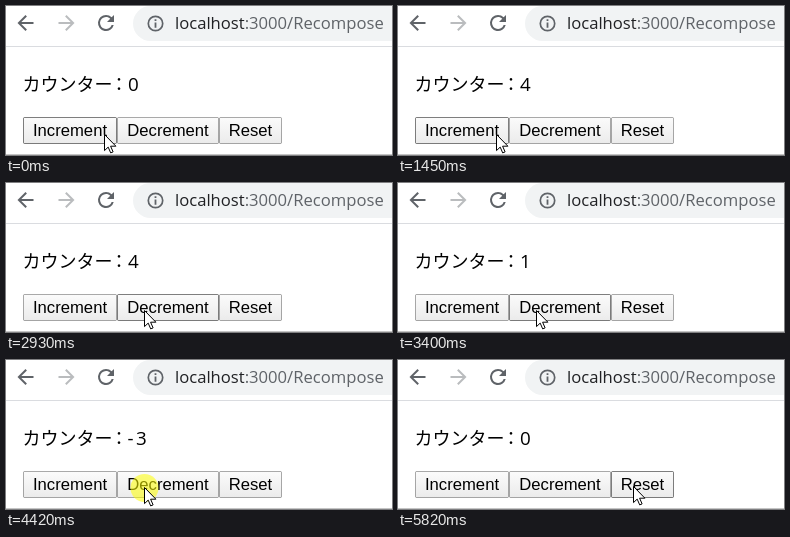
An HTML page for the animation above (6050 ms loop, 386 by 149 pixels).

```html
<!DOCTYPE html>
<html lang="ja">
<head>
<meta charset="utf-8">
<title>Counter</title>
<style>
  html, body { margin: 0; width: 100%; height: 100%; overflow: hidden; background: #fff; }
  svg { display: block; width: 386px; height: 149px; }
  .url { font: 16.64px "Open Sans", sans-serif; fill: #202124; }
  .url .path { fill: #5f6368; }
  .kana { font: 300 18px "Noto Sans CJK JP", "Noto Sans CJK", sans-serif; }
  .digits { font: 18.8px "Open Sans", sans-serif; }
  .label { font: 16.67px "Liberation Sans", Arial, sans-serif; }
</style>
</head>
<body>
<svg viewBox="0 0 386 149">
  <defs>
    <linearGradient id="face" x1="0" y1="0" x2="0" y2="1">
      <stop offset="0" stop-color="#fbfbfb"/>
      <stop offset="1" stop-color="#ebebeb"/>
    </linearGradient>
    <path id="arrow" d="M20 11H7.83l5.59-5.59L12 4l-8 8 8 8 1.41-1.41L7.83 13H20z"/>
  </defs>
  <rect width="386" height="149" fill="#fff"/>

  <!-- toolbar -->
  <g fill="#5f6368">
    <use href="#arrow" transform="translate(7.5 5)"/>
    <use href="#arrow" transform="translate(72.5 5) scale(-1 1)" fill="#babcbe"/>
    <path transform="translate(88 5)" d="M17.65 6.35A7.96 7.96 0 0 0 12 4a8 8 0 1 0 7.73 10h-2.08A6 6 0 1 1 12 6c1.66 0 3.14.69 4.22 1.78L13 11h7V4z"/>
    <rect x="127" y="0" width="300" height="35" rx="17.5" fill="#f1f3f4"/>
    <circle cx="149.5" cy="17.5" r="7.2" fill="none" stroke="#5f6368" stroke-width="1.7"/>
    <path d="M148.6 13.2h1.8v1.8h-1.8zM148.6 16.6h1.8v5.2h-1.8z"/>
  </g>
  <text class="url" x="169" y="23">localhost<tspan class="path">:3000/Recompose</tspan></text>
  <rect y="40" width="386" height="1" fill="#dadce0"/>
  <rect y="148" width="386" height="1" fill="#c4c4c4"/>

  <!-- page -->
  <text class="kana" x="16.5" y="85">カウンター<tspan dx="-2.5">：</tspan></text>
  <text class="digits" id="sign" x="121.5" y="85">-</text>
  <text class="digits" id="digit" y="85"></text>
  <g id="buttons"></g>
  <circle id="halo" r="14" fill="#ff0" fill-opacity=".55"/>
  <path id="cursor" d="M.5 .5V16.6L4.2 13.1 6.7 18.9 9.1 17.9 6.6 12.2H11.9Z" fill="#fff" stroke="#000"/>
</svg>
<script>
  const LOOP = 6050;
  const PERIOD = 150, SHORT = 70, LONG = 170;
  const $ = id => document.getElementById(id);

  const increment = n => n + 1;
  const decrement = n => n - 1;
  const reset = () => 0;

  const easeOut = k => 1 - (1 - k) ** 3;
  const easeInOut = k => k < .5 ? 2 * k * k : 1 - 2 * (1 - k) ** 2;

  // Evenly spaced clicks; from the third on, the button is held longer.
  const burst = (start, times, action) => Array.from({ length: times }, (_, i) => {
    const press = start + i * PERIOD;
    return { press, release: press + (i < 2 ? SHORT : LONG), action };
  });

  const clicks = [
    burst(840, 3, increment), burst(1370, 1, increment), burst(2000, 1, increment),
    burst(2860, 3, decrement), burst(3325, 1, decrement),
    burst(3570, 2, decrement), burst(4110, 4, decrement),
    burst(5740, 1, reset)
  ].flat();

  const home = { x: 98, y: 128 };
  const glides = [
    { start: 2295, end: 2630, steps: 4, x: 138, y: 127, ease: easeOut },
    { start: 4962, end: 5500, steps: 7, x: 235, y: 126, ease: easeInOut }
  ];

  const buttons = [["Increment", 17, 111], ["Decrement", 111, 213], ["Reset", 213, 276]]
    .map(([label, left, right]) => {
      const box = add("rect", {
        x: left + .5, y: 111.5, width: right - left - 1, height: 26, rx: 1,
        fill: "url(#face)", stroke: "#000"
      });
      add("text", { class: "label", x: (left + right) / 2, y: 130, "text-anchor": "middle" })
        .textContent = label;
      return { box, left, right };
    });

  function add(tag, attrs) {
    const node = document.createElementNS("http://www.w3.org/2000/svg", tag);
    for (const name in attrs) node.setAttribute(name, attrs[name]);
    return $("buttons").appendChild(node);
  }

  // The pointer advances in discrete steps, as in a screen recording.
  function pointer(t) {
    return glides.reduce((at, g) => {
      const part = Math.min(1, Math.max(0, (t - g.start) / (g.end - g.start)));
      const k = g.ease(Math.floor(part * g.steps) / g.steps);
      return { x: at.x + (g.x - at.x) * k, y: at.y + (g.y - at.y) * k };
    }, home);
  }

  function draw(t) {
    const { x, y } = pointer(t);
    const down = clicks.some(c => t >= c.press && t < c.release);
    const count = clicks.reduce((n, c) => t >= c.release ? c.action(n) : n, 0);

    $("sign").setAttribute("visibility", count < 0 ? "visible" : "hidden");
    $("digit").setAttribute("x", count < 0 ? 130 : 122);
    $("digit").textContent = Math.abs(count);

    for (const { box, left, right } of buttons) {
      const hover = x >= left && x < right;
      box.setAttribute("stroke-opacity", hover && !down ? .5 : .333);
    }

    $("halo").setAttribute("visibility", down ? "visible" : "hidden");
    $("halo").setAttribute("cx", x + .5);
    $("halo").setAttribute("cy", y + 1);
    $("cursor").setAttribute("transform", `translate(${Math.round(x)} ${Math.round(y)})`);
  }

  const start = performance.now();
  function tick() {
    draw((performance.now() - start) % LOOP);
    requestAnimationFrame(tick);
  }
  tick();
</script>
</body>
</html>
```
